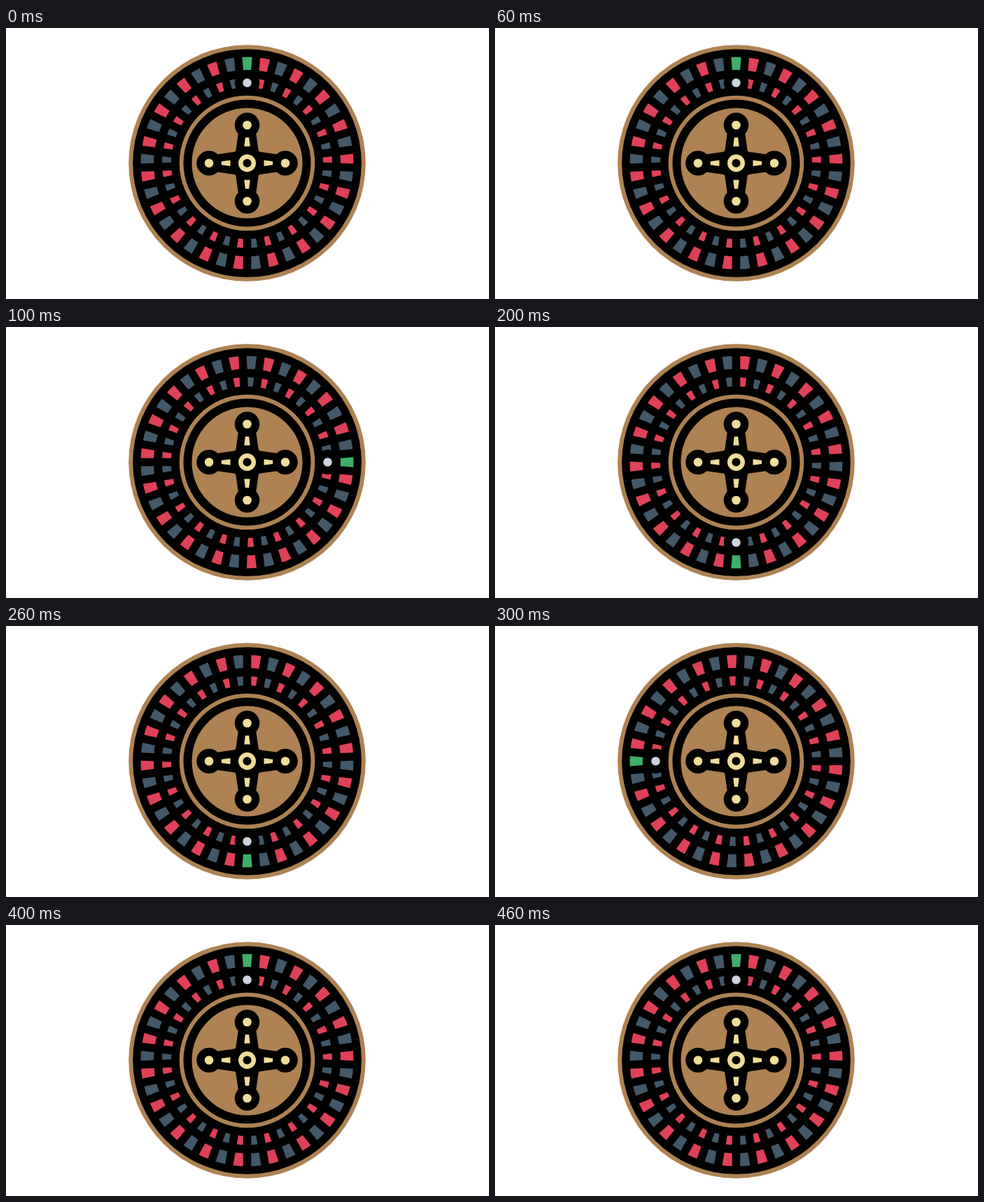
An HTML page for the animation above (500 ms loop, 690x388 px).

```html
<!DOCTYPE html>
<html lang="en">
<head>
<meta charset="utf-8">
<title>Roulette wheel</title>
<style>
html, body { margin: 0; width: 100%; height: 100%; overflow: hidden; background: #fff; }
svg { display: block; width: 100vw; height: 100vh; }
</style>
</head>
<body>
<svg viewBox="0 0 690 388">
  <g transform="translate(344.5 193.5)">
    <g id="wheel"></g>
  </g>
</svg>
<script>
const TAN = '#ae8253', RED = '#df4158', SLATE = '#435868', GREEN = '#40ae69',
      CREAM = '#eedd9b', SILVER = '#cdd4de';
const POCKETS = 37, STEP = 360 / POCKETS, LINE = 11.5;
const LOOP = 500, HOLD = 100;
const wheel = document.getElementById('wheel');

function add(tag, attrs) {
  const el = document.createElementNS('http://www.w3.org/2000/svg', tag);
  for (const key in attrs) el.setAttribute(key, attrs[key]);
  wheel.appendChild(el);
  return el;
}

const disc = (r, fill, x = 0, y = 0) => add('circle', { cx: x, cy: y, r, fill });

// Point at a clockwise angle from the top
function polar(r, deg) {
  const a = deg * Math.PI / 180;
  return (r * Math.sin(a)).toFixed(2) + ' ' + (-r * Math.cos(a)).toFixed(2);
}

function sector(inner, outer, deg, fill) {
  const a = deg - STEP / 2, b = deg + STEP / 2;
  add('path', {
    d: `M${polar(outer, a)}A${outer} ${outer} 0 0 1 ${polar(outer, b)}` +
       `L${polar(inner, b)}A${inner} ${inner} 0 0 0 ${polar(inner, a)}Z`,
    fill
  });
}

function knob(r, fill, x, y) {
  disc(r + LINE, '#000', x, y);
  disc(r, fill, x, y);
}

function drawPockets() {
  for (let i = 0; i < POCKETS; i++) {
    const color = i === 0 ? GREEN : i % 2 ? RED : SLATE;
    sector(133.5, 152, i * STEP, color);
    sector(108.5, 121.5, i * STEP, color);
  }
  for (let i = 0; i < POCKETS; i++) {
    const a = (i + 0.5) * STEP;
    add('path', { d: `M${polar(100, a)}L${polar(158, a)}`, stroke: '#000', 'stroke-width': LINE });
  }
}

function drawCross() {
  const turns = [0, 90, 180, 270];
  disc(24, '#000');
  for (const t of turns)
    add('path', { d: 'M-12.5 -44L12.5 -44L16.5 -16L-16.5 -16Z', transform: `rotate(${t})` });
  for (const t of turns) {
    add('path', { d: 'M-2.6 -37L2.6 -37L4.2 -24L-4.2 -24Z', fill: CREAM, transform: `rotate(${t})` });
    const [x, y] = polar(54.5, t).split(' ');
    knob(6.3, CREAM, x, y);
  }
  disc(12.5, CREAM);
  disc(6, '#000');
}

disc(169.3, TAN);
disc(163.3, '#000');
drawPockets();
disc(96.8, TAN);
disc(91, '#000');
disc(79, TAN);
drawCross();
knob(6.2, SILVER, 0, -115);

// A quarter turn at a time, back at the top for the last hold
function draw(now) {
  const quarter = Math.floor(now % LOOP / HOLD);
  wheel.setAttribute('transform', `rotate(${quarter * 90})`);
}

const start = performance.now();
function tick() {
  draw(performance.now() - start);
  requestAnimationFrame(tick);
}
tick();
</script>
</body>
</html>
```
